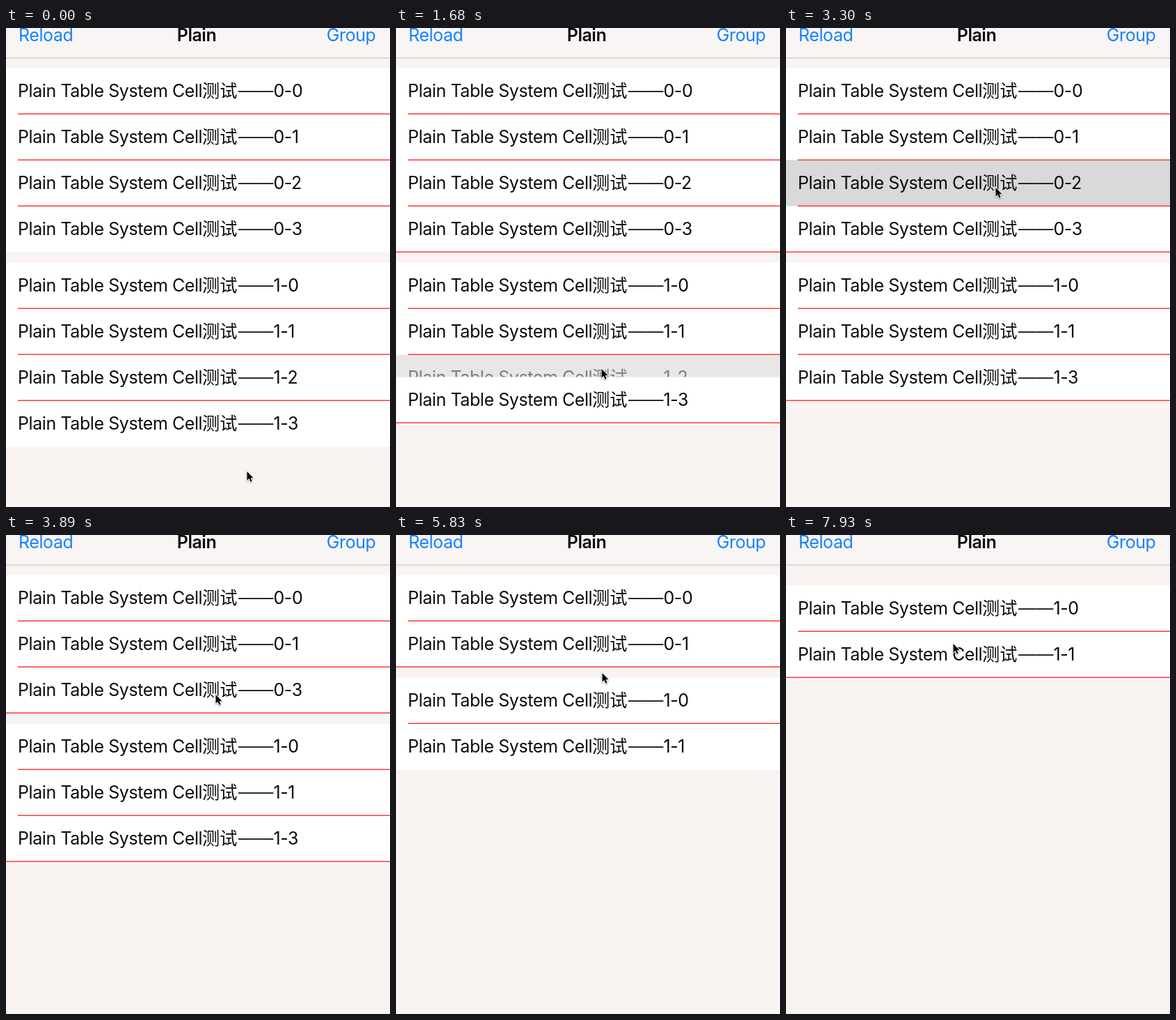
Recreate the animation shown at these times as an HTML page with a canvas. Size 552x687 px, loop 8 s.

```html
<!DOCTYPE html>
<html lang="en">
<head>
<meta charset="utf-8">
<title>Table row removal</title>
<style>
  html, body { margin: 0; width: 100%; height: 100%; overflow: hidden; background: #f9f3f2; }
  canvas { display: block; }
</style>
</head>
<body>
<canvas id="stage" width="552" height="687"></canvas>
<script>
const ctx = document.getElementById('stage').getContext('2d');
const WIDTH = 552, HEIGHT = 687, LOOP = 8000;
const ROW = 66, GAP = 15, TOP = 57, SLIDE = 300;
const BACK = '#f9f3f2', RED = '#ff3a3a', BLUE = '#1482ff', INK = '#0c0c0c';
const LATIN = '25px Inter, sans-serif';
const BOLD = '600 25px Inter, sans-serif';
const HAN = '25.2px "Noto Sans CJK SC", "Noto Sans CJK", sans-serif';
const DASH = '25.2px "Liberation Sans", sans-serif';

// Each removal: the row is pressed at `tap` and starts to vanish at `start`.
const removals = [
  { id: '1-2', tap: 1380, start: 1527 },
  { id: '0-2', tap: 3300, start: 3430 },
  { id: '0-3', tap: 4340, start: 4485, last: true },
  { id: '1-3', tap: 5240, start: 5388, last: true },
  { id: '0-1', tap: 5975, start: 6135, last: true },
  { id: '0-0', tap: 7180, start: 7330, last: true }
];

// Pointer keys: time, x, y.
const pointerPath = [
  [500, 346, 635], [1370, 295, 488], [1800, 295, 488], [2420, 300, 217],
  [2700, 301, 228], [4600, 301, 228], [4940, 253, 393], [5460, 253, 393],
  [5830, 296, 197], [5970, 285, 165], [6400, 285, 165], [6870, 242, 93],
  [7450, 242, 93], [7920, 240, 155]
];

// The picture advances in steps during these spans: start, end, step count.
const bursts = [
  [500, 1680, 8], [1680, 2700, 7], [3300, 3890, 4], [4340, 4940, 4],
  [5240, 5830, 4], [5830, 6430, 4], [6430, 6880, 3], [7180, 7930, 5]
];

const clamp = v => Math.min(1, Math.max(0, v));
const ease = v => v * v * (3 - 2 * v);

function stepTime(time) {
  let held = 0;
  for (const [start, end, count] of bursts) {
    if (time < start) break;
    const step = (end - start) / count;
    held = start + step * Math.min(count, Math.floor((time - start) / step + 0.001));
  }
  return held;
}

function pointerAt(time) {
  const next = pointerPath.findIndex(key => key[0] > time);
  if (next === 0) return pointerPath[0].slice(1);
  if (next < 0) return pointerPath[pointerPath.length - 1].slice(1);
  const [t0, x0, y0] = pointerPath[next - 1], [t1, x1, y1] = pointerPath[next];
  const k = ease((time - t0) / (t1 - t0));
  return [x0 + (x1 - x0) * k, y0 + (y1 - y0) * k];
}

function fill(color, x, y, w, h) {
  ctx.fillStyle = color;
  ctx.fillRect(x, y, w, h);
}

function text(string, x, y, font, color, spacing = '-0.42px', align = 'left') {
  ctx.font = font;
  ctx.letterSpacing = spacing;
  ctx.textAlign = align;
  ctx.fillStyle = color;
  ctx.fillText(string, x, y);
}

function drawRow(id, y, pressed, alpha = 1) {
  ctx.globalAlpha = alpha;
  fill(pressed ? '#d9d9d9' : '#fff', 0, y + 0.5, WIDTH, ROW);
  text('Plain Table System Cell', 17, y + 42, LATIN, INK);
  text('测试', 282, y + 42, HAN, INK, '0px');
  text('——', 334, y + 41, DASH, INK, '0px');
  text(id, 384.5, y + 42, LATIN, INK);
  ctx.globalAlpha = 1;
}

function drawTable(time) {
  const begun = removals.filter(r => time >= r.start);
  const latest = begun[begun.length - 1];
  const rows = [], lines = [], gaps = [];
  let y = TOP, fading = null;

  for (const section of [0, 1]) {
    if (section) gaps.push(y - GAP);
    const kept = [0, 1, 2, 3].map(i => section + '-' + i)
      .filter(id => !begun.some(r => r.id === id && time >= r.start + SLIDE));
    const remaining = kept.filter(id => !latest || id !== latest.id);
    const bare = !latest || (latest.last && latest.id[0] === String(section));

    for (const id of kept) {
      if (latest && id === latest.id) {
        const progress = ease(clamp((time - latest.start) / SLIDE));
        const drop = id === '1-3' ? ROW * progress : 0;
        fading = { id, y: Math.round(y + drop), alpha: 1 - progress };
        y += ROW * (1 - progress);
        continue;
      }
      const isLast = id === remaining[remaining.length - 1];
      const pressed = removals.some(r => r.id === id && time >= r.tap);
      rows.push({ id, y: Math.round(y), pressed });
      y += ROW;
      if (!isLast || !bare) lines.push([isLast ? 0 : 17, Math.round(y)]);
    }
    y += GAP;
  }

  if (fading) drawRow(fading.id, fading.y, true, fading.alpha);
  for (const gap of gaps) fill(BACK, 0, Math.round(gap) + 0.5, WIDTH, GAP);
  for (const row of rows) drawRow(row.id, row.y, row.pressed);
  for (const [x, lineY] of lines) fill(RED, x, lineY - 0.5, WIDTH - x, 1.5);
}

function drawBar() {
  fill('#faf5f5', 0, 0, WIDTH, 42);
  fill('#c3bfbf', 0, 42.5, WIDTH, 1);
  text('Reload', 18, 19, LATIN, BLUE);
  text('Plain', 274, 19, BOLD, INK, '-0.48px', 'center');
  text('Group', 531.5, 19, LATIN, BLUE, '-0.42px', 'right');
}

const arrow = new Path2D('M0 0V14.2L3.2 11.2L5.5 16.5L7.9 15.5L5.7 10.3H10Z');

function drawPointer(time) {
  const [x, y] = pointerAt(time);
  ctx.save();
  ctx.translate(Math.round(x) + 0.5, Math.round(y) + 1);
  ctx.scale(0.9, 0.9);
  ctx.lineJoin = 'round';
  ctx.lineWidth = 2;
  ctx.strokeStyle = '#fff';
  ctx.shadowColor = 'rgba(0,0,0,.35)';
  ctx.shadowBlur = 2;
  ctx.shadowOffsetY = 1;
  ctx.stroke(arrow);
  ctx.shadowColor = 'transparent';
  ctx.fillStyle = '#000';
  ctx.fill(arrow);
  ctx.restore();
}

const origin = performance.now();

function draw() {
  const time = stepTime((performance.now() - origin) % LOOP);
  fill(BACK, 0, 0, WIDTH, HEIGHT);
  drawTable(time);
  drawBar();
  drawPointer(time);
  requestAnimationFrame(draw);
}
draw();
</script>
</body>
</html>
```
